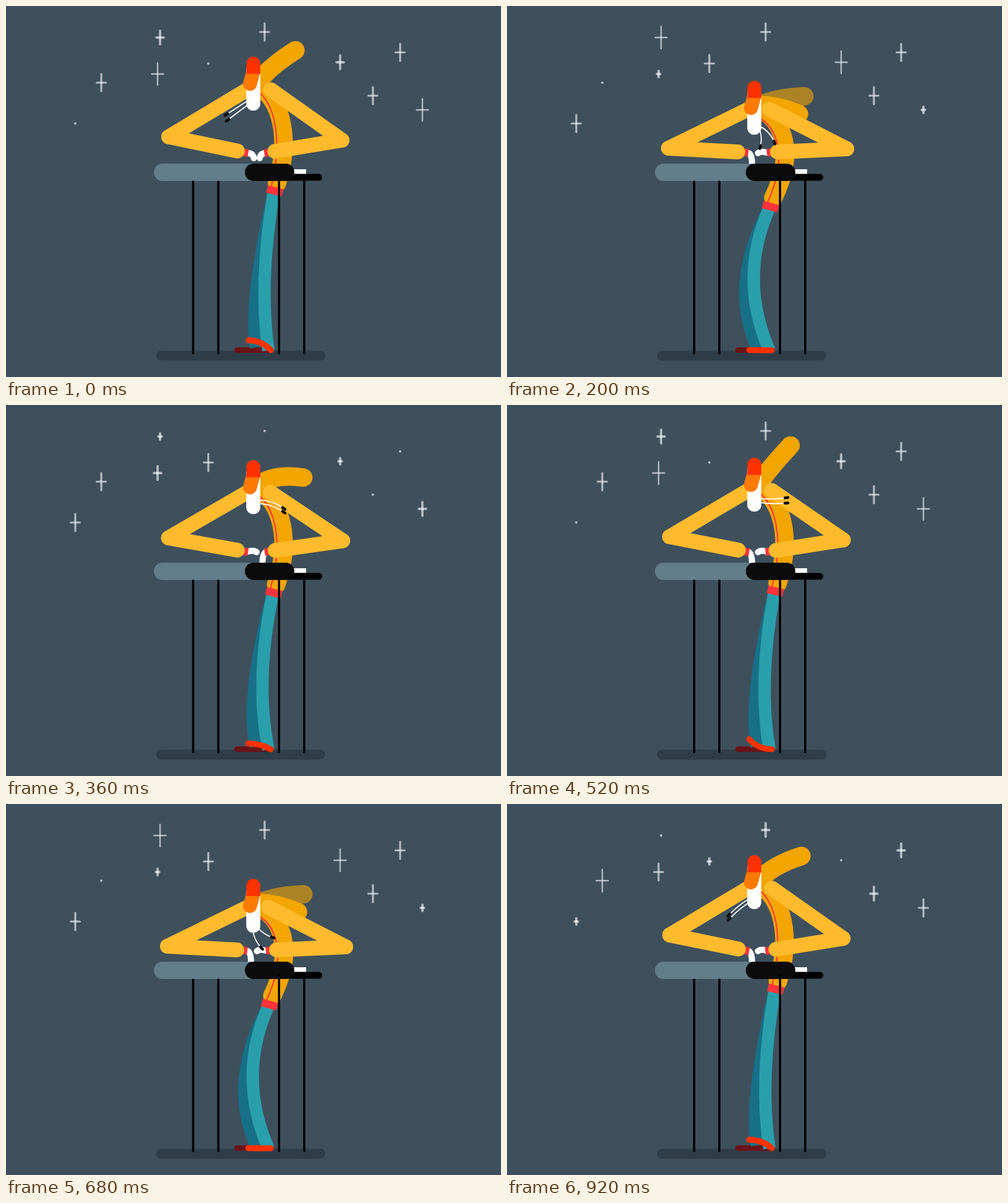
An HTML page with a canvas for the animation above (0.96 s loop, 800 by 600 pixels).

```html
<!DOCTYPE html>
<html lang="en">
<head>
<meta charset="utf-8">
<title>Typing at night</title>
<style>
html, body { margin: 0; width: 100%; height: 100%; overflow: hidden; background: #3f505d; }
canvas { display: block; }
</style>
</head>
<body>
<canvas id="stage" width="800" height="600"></canvas>
<script>
const g = document.getElementById('stage').getContext('2d');
const LOOP = 960, BOB = 480, STEP = 40, TURN = 2 * Math.PI, DEG = TURN / 360;
const YELLOW = '#f3a500', SLEEVE = '#ffbb2c', RED = '#ff3200', BAND = '#ff343a';

// x, y, twinkle phase
const stars = [
  [327, 93, 0], [112, 190, 0], [249, 51, 1], [540, 91, 1], [418, 42, 2],
  [637, 75, 2], [593, 145, 2], [673, 168, 3], [245, 110, 3], [154, 124, 4]
];
const twinkle = [0, 11, 14, 18, 14, 5];

// Time and the angles of both cords
const swing = [
  [0, 147, 143], [200, 76, 40], [360, 14, 14], [520, 0, 3],
  [600, -26, 34], [760, 117, 114], [920, 143, 142], [LOOP, 147, 143]
];

// M both hands low, L or R the hand that presses
const hands = 'MLRMRLMLMRML';
const handPoses = {
  mid: [391, 238, 399, 238, 400.5, 246],
  up: [391, 237, 400, 234, 405, 238],
  down: [391, 238, 396, 241, 396, 257]
};

const mix = (a, b, k) => a.map((n, i) => n + (b[i] - n) * k);
const polar = ([x, y], angle, r) => [x + r * Math.cos(angle * DEG), y + r * Math.sin(angle * DEG)];
const easeInOut = k => k < .5 ? 2 * k * k : 1 - 2 * (1 - k) ** 2;

// 0 at the top of the bob, 1 at the bottom
const bob = p => p < 195 ? easeInOut(p / 195) : Math.min(1, ((BOB - p) / 280) ** 2);

// Two points give a line, three or four a curve
function stroke(color, width, p, cap = 'round') {
  g.strokeStyle = color;
  g.lineWidth = width;
  g.lineCap = cap;
  g.beginPath();
  g.moveTo(p[0], p[1]);
  if (p.length === 4) g.lineTo(p[2], p[3]);
  else if (p.length === 6) g.quadraticCurveTo(...p.slice(2));
  else g.bezierCurveTo(...p.slice(2));
  g.stroke();
}

function box(color, x, y, w, h, radii = 0) {
  g.fillStyle = color;
  g.beginPath();
  g.roundRect(x, y, w, h, radii);
  g.fill();
}

function arm([sx, sy, ex, ey, hx, hy]) {
  stroke(SLEEVE, 24, [sx, sy, ex, ey]);
  stroke(SLEEVE, 24, [ex, ey, hx, hy]);
}

function drawStar([x, y, phase], step) {
  const h = twinkle[(step + phase) % 6], w = h * .53;
  const color = 'rgba(255,255,255,.6)', line = Math.min(4, 6 - h / 5);
  stroke(color, line, [x, y - h, x, y + h + .01]);
  if (h) stroke(color, line, [x - w, y, x + w, y]);
}

function drawLegs(v, p) {
  const hip = mix([433, 300], [424, 327], v);
  stroke('#6a1419', 9, [373.5, 556.5, 428, 556.5]);
  stroke('#177087', 20, [...hip, ...mix([392, 480], [358, 450], v), 404, 552], 'butt');
  stroke('#2a9fac', 20, [...hip, ...mix([408, 447], [373.5, 440], v), 424, 557], 'butt');
  // The toe taps down stiffly, then peels up the other way
  const falling = p > 0 && p <= 200;
  const lift = falling ? 1 - (p - 40) / 160 : p ? (p - 200) / 280 : 1;
  const toe = 556.5 - 16 * lift, bend = falling ? 7 * lift : -7 * lift;
  stroke(RED, 9.5, [391.5, toe, 410 - bend * .8, (toe + 557) / 2 + bend, 428, 556.8]);
}

function drawTail(v, p) {
  const neck = [408, 122 + 38 * v];
  const whip = (color, angle, lag) => stroke(color, 30, [
    ...neck, ...polar(neck, angle - lag, 32), ...polar(neck, angle, Math.min(78, 70 - .35 * angle))
  ]);
  // Whips down between 120 and 200 ms, then swings back up
  if (p > 120 && p < 200) {
    const k = easeInOut((p - 120) / 80);
    return whip(YELLOW, -65 + 78 * k, 12 * k);
  }
  const k = (p + (p < 200 ? BOB : 0) - 200) / 400;
  const angle = 13 - 78 * k * k * (2.3 - 1.3 * k);
  const lag = Math.max(0, 26 * Math.sin(Math.PI * (k + .15)));
  if (!k) whip('rgba(243,165,0,.6)', angle - 24, lag);
  whip(YELLOW, angle, lag);
}

function drawBody(v) {
  stroke(YELLOW, 30, mix([405, 128, 446, 150, 460, 215, 438, 286], [405, 165, 446, 182, 467, 235, 430.5, 310], v));
  stroke(BAND, 2, mix([405, 136, 435, 158, 447, 215, 429, 291], [405, 179, 435, 195, 456, 240, 421, 318], v));
  stroke(BAND, 12.5, mix([422, 296, 447, 302], [413.5, 321, 438.5, 328], v), 'butt');
}

function drawArms(v, frame) {
  const key = hands[frame % 12];
  const pose = side => handPoses[key === 'M' ? 'mid' : key === side ? 'down' : 'up'];
  stroke('#fff', 10, pose('L'));
  stroke('#fff', 10, pose('R').map((n, i) => i % 2 ? n : 810.5 - n));
  stroke(BAND, 12, mix([382, 236.5, 391.5, 238], [381, 236.5, 390, 237.5], v), 'butt');
  stroke(BAND, 12, mix([427, 236.5, 417.5, 238], [429, 236.5, 420, 237.5], v), 'butt');
  arm(mix([388, 136.5, 263, 211.5, 374, 234.5], [388, 168, 261, 230, 373, 236], v));
  arm(mix([428, 135.5, 543, 217, 434.5, 235], [424, 167, 549, 231, 437, 236], v));
}

function drawCords(time, v, top) {
  const i = swing.findIndex((s, n) => time < swing[n + 1][0]);
  const [from, to] = [swing[i], swing[i + 1]];
  const angles = mix(from, to, (time - from[0]) / (to[0] - from[0])).slice(1);
  const bend = -30 * Math.sin(TURN * time / LOOP), length = 50 - 9 * v;
  angles.forEach((angle, n) => {
    const root = [400, top + 65 + 6 * n], end = polar(root, angle, length);
    stroke('#fff', 1.8, [...root, ...polar(root, angle + bend, length / 2), ...end]);
    stroke('#0b0b0b', 4.5, [...end, ...polar(end, angle - bend, 5)]);
  });
}

function drawHead(top) {
  box('#fff', 388.3, top + 10, 22.7, 77.3, 11.3);
  stroke('#ff7a00', 22.5, [400, top + 23, 394.3, top + 44]);
  box(RED, 388.5, top, 22.5, 27.8, [11.2, 11.2, 0, 0]);
}

function drawTable() {
  box('#627d8b', 239, 255, 180, 28, 14);
  box('#fff', 460, 264, 25, 10);
  box('#000', 440, 271.5, 71, 11, 5.5);
  box('#0b0b0b', 386, 255, 80, 28, 14);
  for (const x of [302.5, 343.2]) stroke('#000', 3.5, [x, 284, x, 561.5]);
  for (const x of [441.3, 482]) stroke('#000', 3.5, [x, 278, x, 561.5]);
}

function draw(now) {
  const frame = Math.floor(now % LOOP / STEP), time = frame * STEP, p = time % BOB;
  const v = bob(p), top = 82 + 39 * v;
  box('#3f505d', 0, 0, 800, 600);
  stars.forEach(s => drawStar(s, Math.floor(frame / 2)));
  box('#2f3d49', 242.5, 557.5, 273.5, 16, 8);
  drawLegs(v, p);
  drawTail(v, p);
  drawBody(v);
  drawArms(v, frame);
  drawCords(time, v, top);
  drawHead(top);
  drawTable();
}

const start = performance.now();
function tick() {
  draw(performance.now() - start);
  requestAnimationFrame(tick);
}
tick();
</script>
</body>
</html>
```
